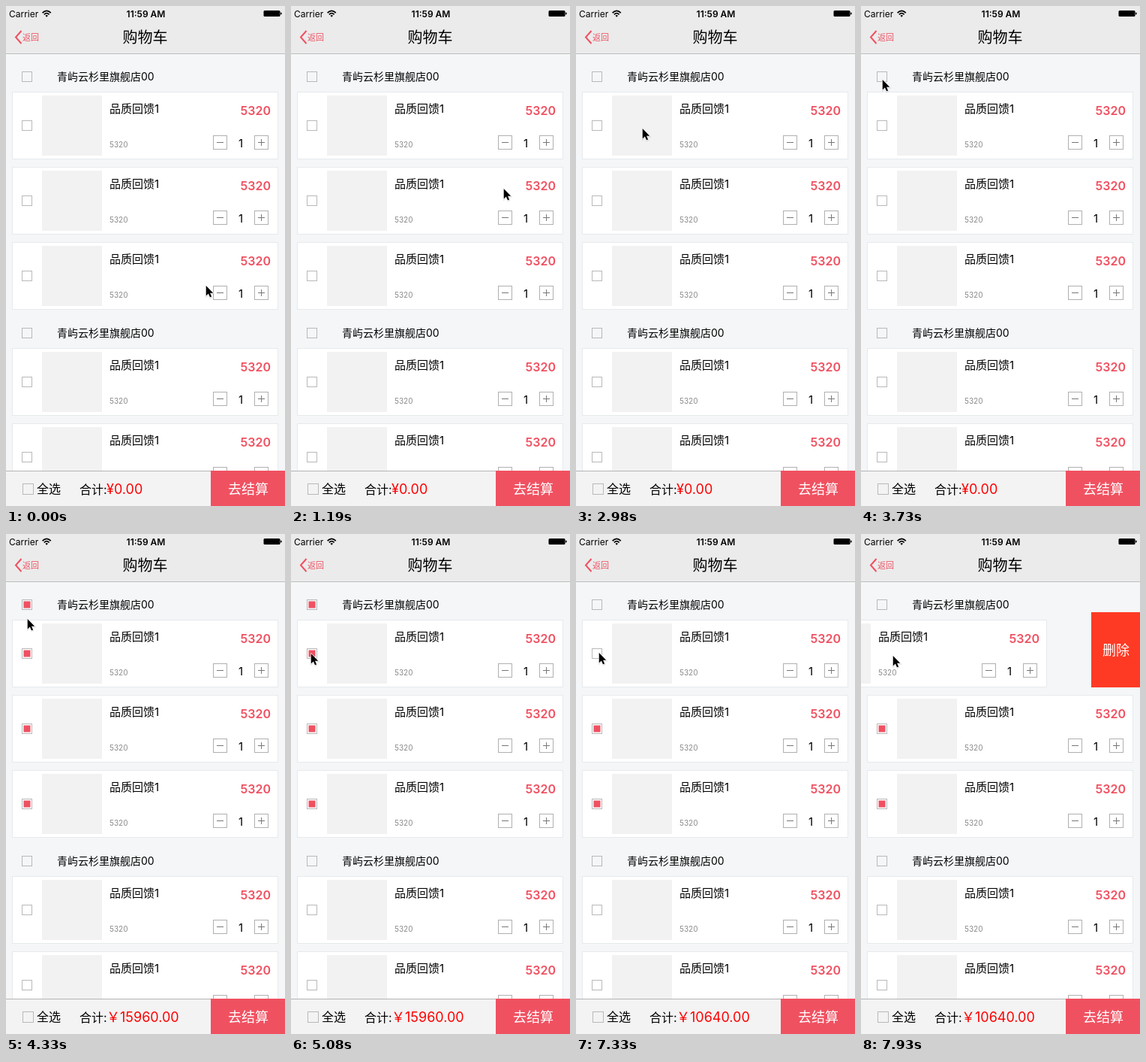
Animation of 372x665 px, one loop 8000 ms. Source, as an HTML page:

```html
<!DOCTYPE html>
<html lang="zh-CN">
<head>
<meta charset="utf-8">
<title>购物车</title>
<style>
  html, body { margin: 0; width: 100%; height: 100%; overflow: hidden; background: #f4f6f8; }
  svg { display: block; width: 100%; height: 100%; }
  text { font-family: Inter, "Noto Sans CJK SC", "Noto Sans CJK", sans-serif; white-space: pre; }
</style>
</head>
<body>
<svg id="stage" viewBox="0 0 372 665"></svg>
<script>
const LOOP = 8000;
const TICK = 150;
const PHASE = 20;
const PRICE = 5320;
const PINK = '#f05161';
const PAGE = '#f4f6f8';
const SHOP = '青屿云杉里旗舰店00';
const MIDDLE = 'text-anchor="middle"';

const rect = (x, y, w, h, fill, extra = '') =>
  `<rect x="${x}" y="${y}" width="${w}" height="${h}" fill="${fill}" ${extra}/>`;
const frame = (x, y, w, h, fill, stroke) =>
  rect(x + .5, y + .5, w - 1, h - 1, fill, `stroke="${stroke}"`);
const label = (x, y, size, str, fill = '#000', extra = '') =>
  `<text x="${x}" y="${y}" font-size="${size}" fill="${fill}" ${extra}>${str}</text>`;

const checkbox = (x, y, name, size = 14) =>
  frame(x, y, size, size, 'none', '#b9b9b9') +
  (name ? rect(x + 2.5, y + 2.5, 9, 9, PINK, `class="${name}" visibility="hidden"`) : '');

const stepper = (x, y, plus) =>
  frame(x, y, 19, 19, '#fff', '#b0b0b0') +
  rect(x + 5, y + 9, 9, 1, '#777') +
  (plus ? rect(x + 9, y + 5, 1, 9, '#777') : '');

const card = (y, name) => `<g transform="translate(0 ${y})">` +
  frame(8, 0, 355, 90, '#fff', '#e7eaec') +
  checkbox(21, 38, name) +
  rect(48, 5, 80, 80, '#f2f2f2') +
  label(138, 28, 15, '品质回馈1') +
  label(138, 73.5, 10, PRICE, '#8a8a8a') +
  label(353, 31, 16, PRICE, PINK, 'font-weight="600" text-anchor="end"') +
  stepper(276, 58) + label(313, 73.5, 15, '1', '#000', MIDDLE) + stepper(331, 58, true) +
  '</g>';

const shop = (y, names) =>
  checkbox(21, y - 7, names[0]) + label(68, y + 5, 14, SHOP) +
  [1, 2].map(i => card(y + 20 + 100 * i, names[1])).join('');

const swipeRow = () =>
  `<g id="delete">${rect(307, 104, 65, 100, '#ff3a24')}
     ${label(340, 160.5, 18, '删除', '#fff', MIDDLE)}</g>
   <g id="swipe">${rect(0, 104, 372, 100, PAGE)}${card(114, 'first')}</g>`;

const navBar = () =>
  rect(0, 0, 372, 63, '#ebebeb') + rect(0, 63, 372, 1, '#bcbdbe') +
  label(4, 14.5, 12, 'Carrier') +
  `<path d="M48.6 9.2Q54.2 3.6 59.8 9.2M50.8 11.3Q54.2 8 57.6 11.3"
     fill="none" stroke="#000" stroke-width="1.7"/>
   <path d="M52.4 12.8Q54.2 11.2 56 12.8L54.2 14.8Z"/>` +
  label(186.5, 14.5, 12, '11:59 AM', '#000', 'font-weight="600" ' + MIDDLE) +
  rect(343.5, 6, 22, 8, '#000', 'rx="1.5"') + rect(366, 8.5, 1.5, 3, '#000', 'rx=".7"') +
  `<path d="M20.5 33L13 41.5L20.5 50" fill="none" stroke="${PINK}" stroke-width="2"/>` +
  label(22, 45.5, 11, '返回', PINK) +
  label(185.5, 49, 20, '购物车', '#000', MIDDLE);

const bottomBar = () =>
  rect(0, 618, 372, 47, '#f3f3f3') + rect(0, 618, 372, 1, '#b4b4b4') +
  checkbox(22, 635, '', 15) + label(41, 648, 16, '全选') +
  label(98, 649, 16, '合计:') +
  label(134, 649, 18, '', '#f00', 'id="total"') +
  rect(273, 618, 99, 47, PINK) +
  label(323, 649, 18, '去结算', '#fff', MIDDLE);

const ARROW = 'M0 0V16L3.7 12.6L6.2 18.2L8.7 17.1L6.3 11.7H11.2Z';
const cursor = () => `<g id="cursor">
  <path d="${ARROW}" transform="translate(.3 1)" fill="none" stroke="#000" stroke-opacity=".14" stroke-width="2"/>
  <path d="${ARROW}" stroke="#fff" stroke-width="1.6" paint-order="stroke" stroke-linejoin="round"/></g>`;

document.getElementById('stage').innerHTML =
  rect(0, 0, 372, 665, PAGE) +
  shop(94, ['all', 'rest']) + swipeRow() +
  shop(435, []) + card(455) +
  navBar() + bottomBar() + cursor();

// Places the pointer eases between: [tick, x, y]
const STOPS = [
  [1, 266, 371], [5, 283, 522], [8, 283, 242], [12, 268, 170], [16, 337, 181],
  [17, 335, 190], [20, 88, 162], [25, 28, 97], [27, 28, 97], [29, 28, 112],
  [34, 26, 158], [48, 26, 158], [49, 30, 157], [51, 157, 164], [53, 42, 161]
];
const SHOP_CLICK = 26;
const ITEM_CLICKS = [36, 41, 49];
const DRAG = { tick: 51, x: 157 };

const ease = p => p * p * (3 - 2 * p);
const byId = id => document.getElementById(id);
const show = (selector, on) => document.querySelectorAll(selector)
  .forEach(el => el.setAttribute('visibility', on ? 'visible' : 'hidden'));

function pointerAt(tick) {
  const next = STOPS.findIndex(stop => stop[0] >= tick);
  if (next < 1) return STOPS.at(next).slice(1);
  const [t0, x0, y0] = STOPS[next - 1];
  const [t1, x1, y1] = STOPS[next];
  const p = ease((tick - t0) / (t1 - t0));
  return [x0 + (x1 - x0) * p, y0 + (y1 - y0) * p].map(Math.round);
}

function draw(time) {
  const tick = Math.floor((time + PHASE) / TICK);
  const [x, y] = pointerAt(tick);
  const shift = tick > DRAG.tick ? Math.min(0, x - DRAG.x) : 0;
  const rest = tick >= SHOP_CLICK;
  const first = rest && ITEM_CLICKS.filter(click => click <= tick).length % 2 === 0;
  const count = 2 * rest + first;

  byId('cursor').setAttribute('transform', `translate(${x + .7} ${y + .9}) scale(.85)`);
  byId('swipe').setAttribute('transform', `translate(${shift} 0)`);
  show('#delete', shift < 0);
  show('.all, .first', first);
  show('.rest', rest);
  byId('total').textContent = (count ? '￥' : '¥') + (count * PRICE).toFixed(2);
}

const start = performance.now();
function play() {
  draw((performance.now() - start) % LOOP);
  requestAnimationFrame(play);
}
play();
</script>
</body>
</html>
```
